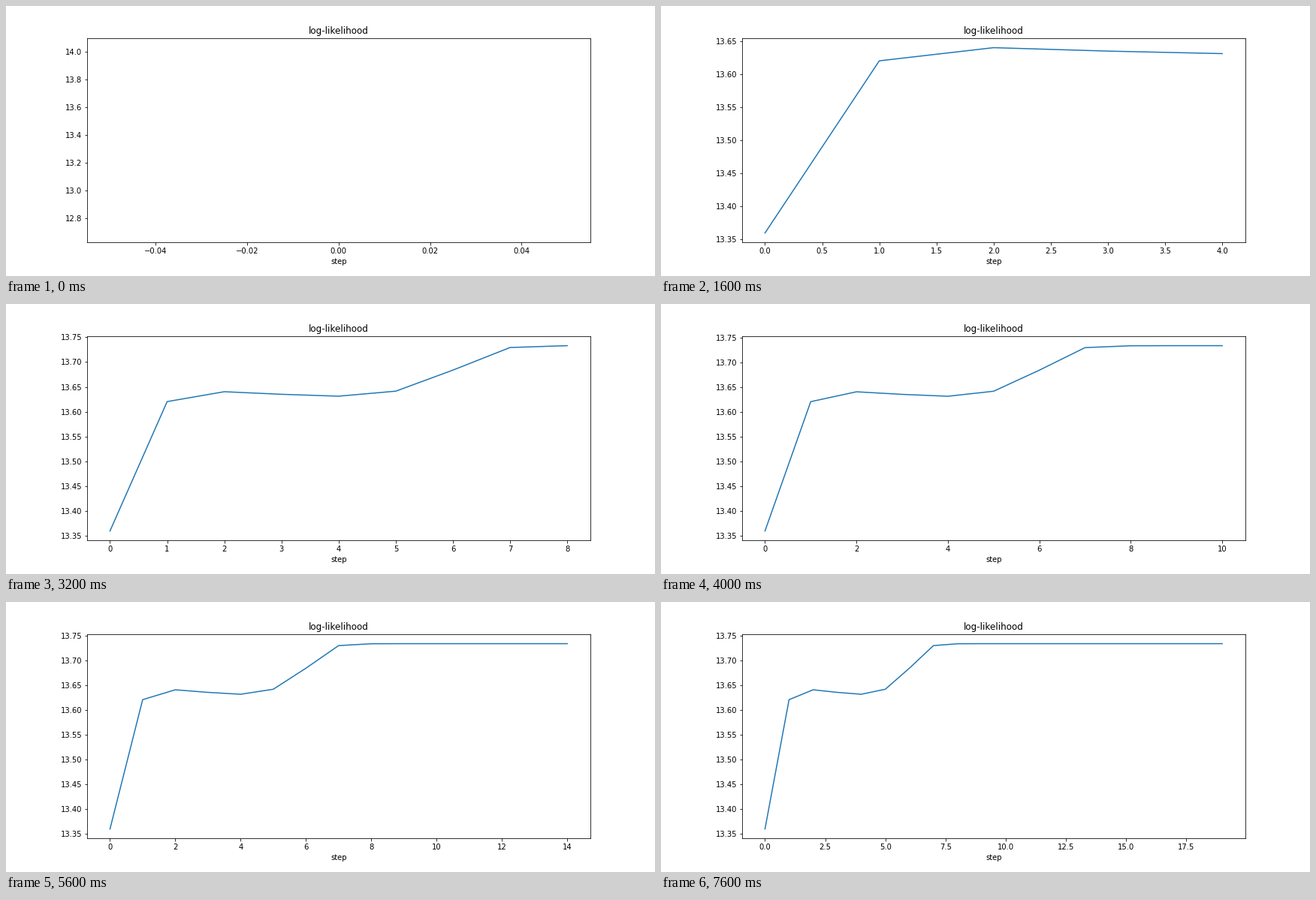
A matplotlib script for the animation above (8000 ms loop, 864 by 360 pixels).

```python
import matplotlib.pyplot as plt
import numpy as np
from matplotlib.animation import FuncAnimation

STEPS = 20
INTERVAL = 400  # ms

plt.rcParams["font.family"] = "DejaVu Sans"
plt.rcParams["font.size"] = 10

# The likelihood climbs for a few steps, then stays converged.
climb = [13.3600, 13.6205, 13.6404, 13.6352, 13.6314,
         13.6415, 13.6839, 13.7294, 13.7331]
values = np.array(climb + [13.7333] * (STEPS - len(climb)))
steps = np.arange(STEPS)

fig, ax = plt.subplots(figsize=(12, 5), dpi=72, facecolor="white")
fig.subplots_adjust(left=0.125, right=0.9, bottom=0.125, top=0.88)
ax.set_title("log-likelihood")
ax.set_xlabel("step")
line, = ax.plot([], [], color="#1f77b4", lw=1.5)


def update(frame):
    line.set_data(steps[:frame + 1], values[:frame + 1])
    ax.relim()
    ax.autoscale(True)
    ax.autoscale_view()
    return line,


anim = FuncAnimation(fig, update, frames=STEPS, interval=INTERVAL,
                     init_func=lambda: update(0), repeat=True, repeat_delay=0)
plt.show()
```
